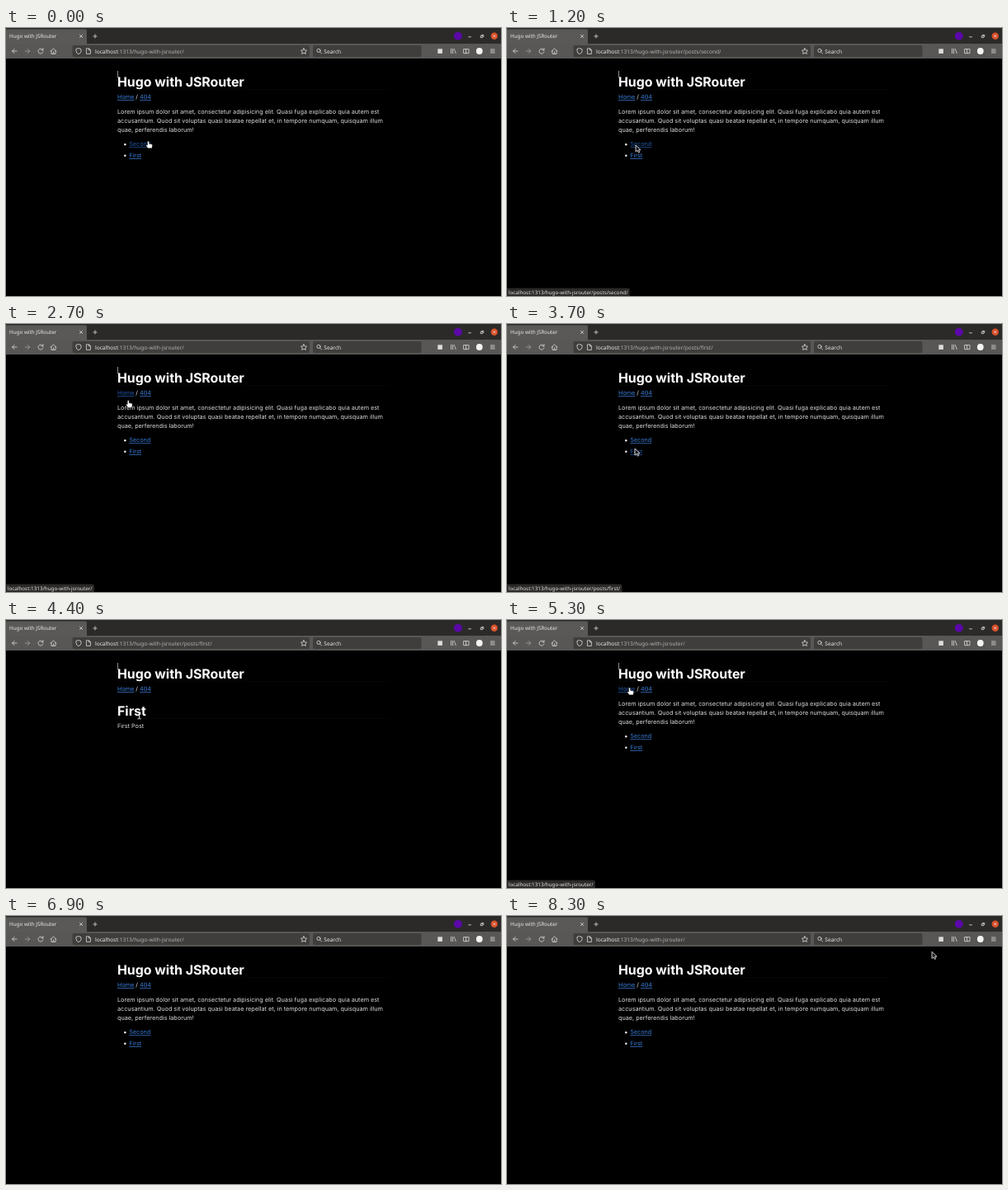
These frames come from a looping animation (600 px wide and 325 px high, 8700 ms). An HTML page:

```html
<!DOCTYPE html>
<html lang="en">
<head>
<meta charset="utf-8">
<title>Hugo with JSRouter</title>
<style>
html, body { margin: 0; width: 100%; height: 100%; overflow: hidden; background: #000; }
svg { display: block; width: 600px; height: 325px; }
text { white-space: pre; text-rendering: geometricPrecision; }
.ui text { font: 6.6px "Noto Sans", "Open Sans", sans-serif; fill: #e8e7e5; }
.ui .small { font-size: 6.3px; }
.ui .dim { fill: #b3b1ae; }
.icon { fill: none; stroke: #dddcda; stroke-width: .8; stroke-linecap: round; stroke-linejoin: round; }
.field { fill: #403e3c; }
.page text { font: 7.25px Inter, "Noto Sans", sans-serif; font-optical-sizing: none; fill: #dedede; }
.page .title { font-size: 15.9px; font-weight: 700; fill: #fff; }
.page .link { fill: #3a7fd8; text-decoration: underline; text-decoration-thickness: .6px; }
.page .link.hot { fill: #2259aa; }
.rule { fill: #090909; }
.pointer { stroke-width: .8; stroke-linejoin: round; }
</style>
</head>
<body>
<svg viewBox="0 0 600 325">
  <rect width="600" height="325"/>

  <g class="page">
    <text class="title" x="135" y="71">Hugo with JSRouter</text>
    <rect class="rule" x="135" y="74" width="330" height=".7"/>
    <rect id="caret" x="135" y="52" width=".7" height="8.5" fill="#ccc"/>
    <text class="link" id="home" x="135" y="86.2">Home</text>
    <text x="157.3" y="86.2">/</text>
    <text class="link" x="162" y="86.2">404</text>

    <g id="index">
      <text class="copy" x="135" y="103.9">Lorem ipsum dolor sit amet, consectetur adipisicing elit. Quasi fuga explicabo quia autem est</text>
      <text class="copy" x="135" y="114.9">accusantium. Quod sit voluptas quasi beatae repellat et, in tempore numquam, quisquam illum</text>
      <text class="copy" x="135" y="125.9">quae, perferendis laborum!</text>
      <circle cx="144.3" cy="141.2" r="1.3" fill="#e8e8e8"/>
      <circle cx="144.3" cy="154.7" r="1.3" fill="#e8e8e8"/>
      <text class="link" id="second" x="149.2" y="143.4">Second</text>
      <text class="link" id="first" x="149.2" y="157.1">First</text>
    </g>

    <g id="post">
      <text class="title copy" id="postTitle" x="135" y="116"></text>
      <rect class="rule" x="135" y="119" width="330" height=".7"/>
      <text class="copy" id="postBody" x="135" y="130.7"></text>
    </g>
  </g>

  <g class="ui">
    <rect width="600" height="20" fill="#2c2a29"/>
    <rect y="19" width="600" height="18" fill="#595755"/>
    <path d="M0 1.5H96.5Q98 1.5 98 3V19H0Z" fill="#5b5957"/>
    <text class="small" x="4" y="12.4">Hugo with JSRouter</text>
    <path class="icon" d="M89.4 8.4l3.2 3.2m0-3.2l-3.2 3.2M105.8 10h4.4m-2.2-2.2v4.4"/>
    <circle cx="547.8" cy="9.8" r="4.9" fill="#5a08a8"/>
    <path class="icon" d="M560.6 10.8h3M575.6 9.4h2.2v2.2h-2.2zM576.6 8.4h2.2v2.2"/>
    <circle cx="591.8" cy="9.8" r="4.2" fill="#d94f28"/>
    <path class="icon" d="M590.5 8.5l2.6 2.6m0-2.6l-2.6 2.6"/>

    <path class="icon" d="M13 28H7.5m2.6-2.6L7.5 28l2.6 2.6"/>
    <path class="icon" opacity=".55" d="M23.2 28h5.5m-2.6-2.6l2.6 2.6-2.6 2.6"/>
    <path class="icon" d="M44.5 26.4a3 3 0 1 0 .5 2.3M45 24.6v2.2h-2.2"/>
    <path class="icon" d="M54 28.2l3.5-3.3 3.5 3.3M55 27.6v3.8h5v-3.8M57.5 31v-2"/>

    <rect class="field" x="80.5" y="21" width="287.5" height="14" rx="2"/>
    <path class="icon" d="M88 24.7l3 1v2.4q0 2.2-3 3.6-3-1.4-3-3.6v-2.4z"/>
    <path class="icon" d="M97.8 24.8h2.8l1.8 1.8v4.8h-4.6zM100.4 25v1.8h1.8"/>
    <text x="108" y="30.5">localhost<tspan class="dim" id="path"></tspan></text>
    <path class="icon" d="M361 24.6l1.1 2.3 2.5.3-1.8 1.7.5 2.5-2.3-1.2-2.3 1.2.5-2.5-1.8-1.7 2.5-.3z"/>

    <rect class="field" x="372" y="21" width="131.5" height="14" rx="2"/>
    <circle class="icon" cx="379" cy="27.4" r="2.1"/>
    <path class="icon" d="M380.6 29l2 2"/>
    <text x="385.3" y="30.5">Search</text>

    <rect x="523.3" y="25.3" width="5.6" height="5.6" fill="#dddcda"/>
    <path class="icon" d="M539.5 25.3v5.4M541.5 25.3v5.4M543.3 25.5l1.9 5.2"/>
    <path class="icon" d="M555 25.6h6v5h-6zM557.6 25.6v5"/>
    <circle cx="573.8" cy="28" r="3.9" fill="#f4f4f4"/>
    <path class="icon" d="M587.4 26h4.8M587.4 28h4.8M587.4 30h4.8"/>

    <g id="status">
      <path id="statusBox" fill="#2c2a29"/>
      <text class="small" id="statusText" x="1.8" y="322.9"></text>
    </g>
  </g>

  <g id="cursor" class="pointer">
    <path id="arrow" d="M0 0V8.2L2 6.4 3.4 9.2 4.8 8.5 3.5 5.9H6Z" fill="#1b1b1b" stroke="#f2f2f2"/>
    <path id="hand" d="M-1 .8Q0-.4 .9 .8V3.4L4 4Q5 4.3 4.9 5.4L4.3 8.8H-.4L-2.8 5.6Q-2.9 4.4-1 5.2Z" fill="#fff" stroke="#222" stroke-width=".4"/>
    <path id="beam" d="M-2-4Q0-4 0-3 0-4 2-4M0-3V3M-2 4Q0 4 0 3 0 4 2 4" fill="none" stroke="#e8e8e8" stroke-width="1"/>
  </g>
</svg>

<script>
const LOOP = 8700, STEP = 100, LOAD = 100;
const ROOT = ':1313/hugo-with-jsrouter/';
const $ = id => document.getElementById(id);
const all = selector => [...document.querySelectorAll(selector)];

// Each link the user rests on, clicks and leaves again.
const visits = [
  { page: 'second', rest: 800, click: 1200, leave: 1500 },
  { page: 'home', rest: 2100, click: 2500, leave: 2700 },
  { page: 'first', rest: 3500, click: 3700, leave: 3700 },
  { page: 'home', rest: 4900, click: 5200, leave: 5700 },
];

// Pointer strokes, each starting where the last one ended.
const origin = { x: 172.5, y: 137 };
const strokes = [
  { from: 0, to: 800, x: 156, y: 142 },
  { from: 1400, to: 2000, x: 147, y: 81.5 },
  { from: 2500, to: 3300, x: 155, y: 151 },
  { from: 4200, to: 4400, x: 161.5, y: 116 },
  { from: 4400, to: 4900, x: 148.6, y: 82 },
  { from: 5600, to: 6100, x: 186.3, y: 112 },
  { from: 6500, to: 6900, x: 515, y: -25 },
  { from: 7550, to: 7750, x: 513, y: 67 },
  { from: 7900, to: 8300, x: 515, y: 43.3 },
];

const ramp = (t, from, to) => Math.min(1, Math.max(0, (t - from) / (to - from)));
const smooth = p => p * p * (3 - 2 * p);
const show = (id, on) => { $(id).style.display = on ? '' : 'none'; };
const pathOf = page => ROOT + (page === 'home' ? '' : `posts/${page}/`);

function pageAt(t) {
  const done = visits.filter(v => v.click <= t);
  return done.length ? done[done.length - 1].page : 'home';
}

function pointerAt(t) {
  return strokes.reduce((pos, s) => {
    const p = smooth(ramp(t, s.from, s.to));
    return { x: pos.x + (s.x - pos.x) * p, y: pos.y + (s.y - pos.y) * p };
  }, origin);
}

function isOver(el, { x, y }, pad = 5) {
  const box = el.getBoundingClientRect();
  return x > box.left - pad && x < box.right + pad && y > box.top - pad && y < box.bottom + pad;
}

function drawPage(t, page) {
  show('index', page === 'home');
  show('post', page !== 'home');
  const name = page === 'second' ? 'Second' : 'First';
  $('postTitle').textContent = name;
  $('postBody').textContent = name + ' Post';
  show('caret', t < 6300 && (t + 700) % 1700 < 1000);
}

function drawPointer(t, loading) {
  const pos = pointerAt(t);
  const link = all('.link').find(el => isOver(el, pos));
  all('.link').forEach(el => el.classList.toggle('hot', el === link));

  let shape = 'arrow';
  if (link) shape = loading ? 'arrow' : 'hand';
  else if (all('.copy').some(el => isOver(el, pos))) shape = 'beam';
  for (const id of ['arrow', 'hand', 'beam']) show(id, id === shape);
  $('cursor').setAttribute('transform', `translate(${pos.x} ${pos.y})`);
}

function drawStatus(t) {
  const visit = visits.filter(v => v.rest <= t).pop();
  show('status', visit);
  if (!visit) return;
  const { page, rest, leave } = visit;
  $('statusText').textContent = 'localhost' + pathOf(page);
  const width = $('statusText').getComputedTextLength() + 4;
  $('statusBox').setAttribute('d', `M0 315.5H${width - 2}q2 0 2 2V325H0Z`);
  $('status').style.opacity = ramp(t, rest + 100, rest + 200) * (1 - ramp(t, leave, leave + 450));
}

function render(t) {
  const address = pageAt(t), page = pageAt(t - LOAD);
  $('path').textContent = pathOf(address);
  drawPage(t, page);
  drawPointer(t, address !== page);
  drawStatus(t);
}

function tick() {
  const t = performance.now() % LOOP;
  render(Math.floor(t / STEP) * STEP);
  requestAnimationFrame(tick);
}
tick();
</script>
</body>
</html>
```
